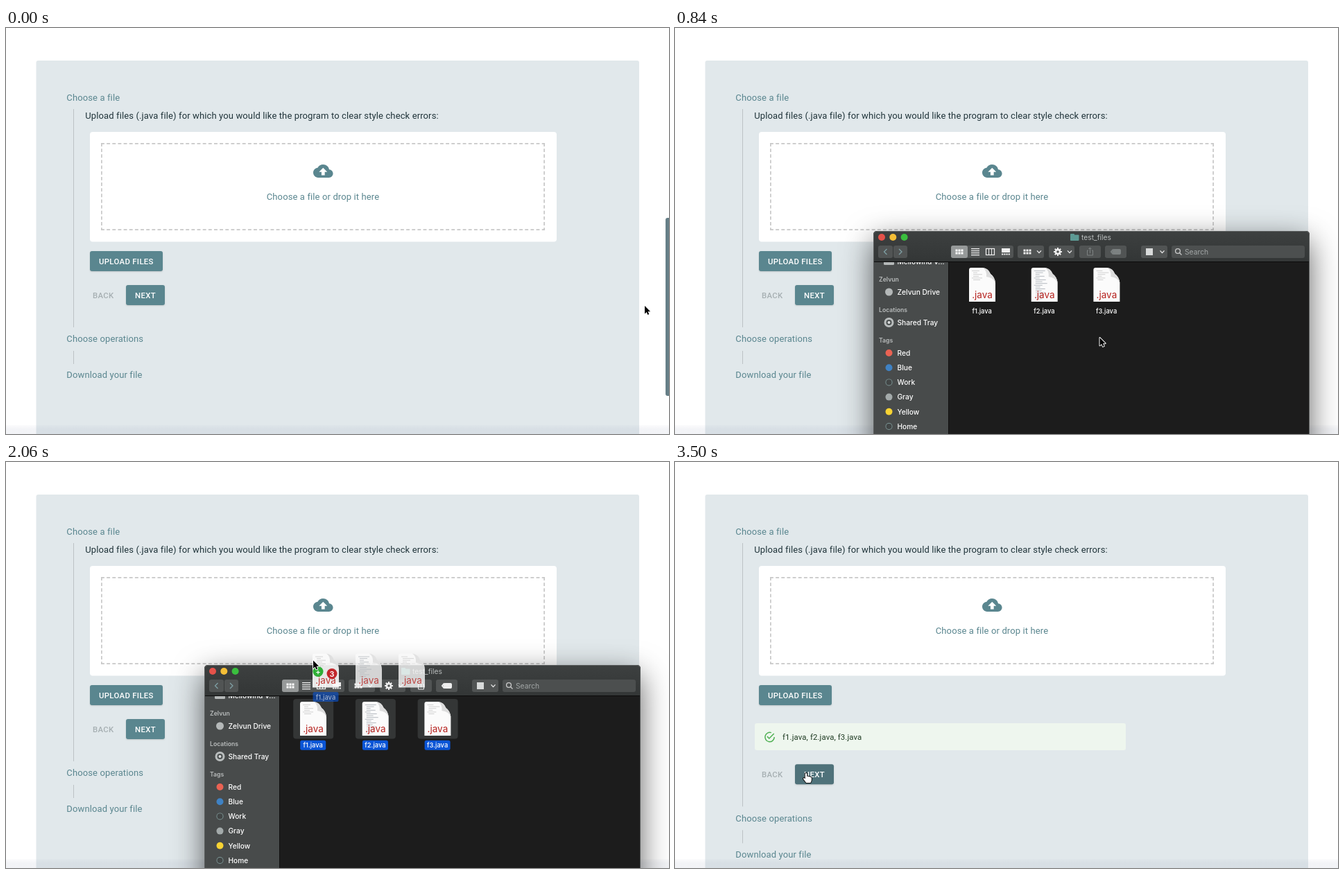
These frames come from a looping animation (956x586 px, 3520 ms). An HTML page with a canvas:

```html
<!DOCTYPE html>
<html lang="en">
<head>
<meta charset="utf-8">
<title>File upload</title>
<style>
html, body { margin: 0; width: 956px; height: 586px; overflow: hidden; background: #fff; }
canvas { display: block; }
</style>
</head>
<body>
<canvas id="stage" width="956" height="586"></canvas>
<script>
const LOOP = 3520, STEP = 20;
const TEAL = '#5a868f';
const stage = document.getElementById('stage').getContext('2d');

// The file window is painted here first, so that it can be warped row by row.
const LEFT = 226, TOP = 233;
const sheet = document.createElement('canvas');
sheet.width = 760;
sheet.height = 520;
const win = sheet.getContext('2d');
let c = stage;

const CLOUD = new Path2D('M19.35 10.04C18.67 6.59 15.64 4 12 4 9.11 4 6.6 5.64 5.35 8.04 2.34 8.36 0 10.91 0 14c0 3.31 2.69 6 6 6h13c2.76 0 5-2.24 5-5 0-2.64-2.05-4.78-4.65-4.96zM14 13v4h-4v-4H7l5-5 5 5h-3z');
const CHECK = new Path2D('M20 12A8 8 0 1 1 14.2 4.31L15.77 2.74A10 10 0 1 0 22 12M7.91 10.08L6.5 11.5 11 16 21 6 19.59 4.58 11 13.17z');
const ARROW = new Path2D('M0 0V12L2.8 9.4 4.6 13.6 6.6 12.7 4.8 8.7H8.6z');
const HAND = new Path2D('M-1.2 1Q0-.8 1.2 1V5Q2.6 4 3.6 5.3 5 4.6 5.8 5.9 7.6 5.6 7.8 7.2V10Q7.6 12 6.3 14H.2Q-1.6 11.4-3.8 8.8-4.4 7-2.8 7L-1.2 8.4z');
const PAGE = new Path2D('M0 3Q0 0 3 0H20Q28 1 31 9 37 13 38 22V49H0z');
const FOLD = new Path2D('M20 0Q28 1 31 9 37 13 38 22 35 14 25 13 26 4 20 0z');

// time, x, y of the pointer tip
const PATH = [
  [0, 921, 401], [60, 921, 401], [160, 880, 490], [280, 800, 604], [560, 780, 604],
  [680, 690, 520], [820, 612.5, 447], [860, 612.5, 447], [960, 680, 415], [1060, 718, 389],
  [1120, 718, 389], [1320, 464, 385], [1400, 412, 379], [1500, 412, 379], [1620, 425, 357],
  [1760, 425, 357], [1900, 432, 330], [2060, 443, 286.5], [2180, 408, 248], [2300, 378, 222],
  [2820, 378, 222], [3000, 310, 310], [3180, 222, 424], [3320, 189, 449], [3520, 189, 449]
];

const mix = (a, b, k) => a + (b - a) * k;
const part = (t, a, b) => Math.min(1, Math.max(0, (t - a) / (b - a)));
const wave = k => (1 - Math.cos(Math.PI * k)) / 2;

function pointer(t) {
  const i = Math.max(1, PATH.findIndex(p => p[0] >= t));
  const a = PATH[i - 1], b = PATH[i], k = part(t, a[0], b[0]);
  return [mix(a[1], b[1], k), mix(a[2], b[2], k)];
}

function box(x, y, w, h, fill, r = 0) {
  c.fillStyle = fill;
  c.beginPath();
  c.roundRect(x, y, w, h, r);
  c.fill();
}

function dot(x, y, r, fill) {
  c.fillStyle = fill;
  c.beginPath();
  c.arc(x, y, r, 0, 7);
  c.fill();
}

function line(points, color, width = 1) {
  c.strokeStyle = color;
  c.lineWidth = width;
  c.beginPath();
  points.forEach(p => c.lineTo(...p));
  c.stroke();
}

function text(str, x, y, font, fill, gap = 0, align = 'left') {
  c.font = font + ', sans-serif';
  c.letterSpacing = gap + 'px';
  c.textAlign = align;
  c.fillStyle = fill;
  c.fillText(str, x, y);
}

function shape(path, x, y, fill, scale = 1, edge, width = 1) {
  c.save();
  c.translate(x, y);
  c.scale(scale, scale);
  if (edge) {
    c.strokeStyle = edge;
    c.lineWidth = width;
    c.lineJoin = 'round';
    c.stroke(path);
  }
  c.fillStyle = fill;
  c.fill(path);
  c.restore();
}

const body = (str, x, y, fill = TEAL, align) => text(str, x, y, '13px Roboto', fill, 0.122, align);
const caps = (str, x, y, fill) => text(str, x, y, '500 11.375px Roboto', fill, 0.325);

function button(label, x, y, w, fill) {
  c.save();
  c.shadowColor = 'rgba(0,0,0,.15)';
  c.shadowBlur = 2;
  c.shadowOffsetY = 1;
  box(x, y, w, 29, fill, 3);
  c.restore();
  caps(label, x + 13, y + 18.7, '#fff');
}

function dropZone(over) {
  box(121, 150, 673, 158.5, '#fff', 4);
  const color = over ? TEAL : '#c8c8c8';
  c.setLineDash([4.9, 3.25]);
  for (const y of [166.9, 291.1]) line([[137, y], [777, y]], color, 1.7);
  for (const x of [137.9, 776.1]) line([[x, 166], [x, 292]], color, 1.7);
  c.setLineDash([]);
  shape(CLOUD, 443, 192.2, TEAL, 1.19);
  body(over ? 'Drop it here!' : 'Choose a file or drop it here', 457, 247.6, TEAL, 'center');
}

function page(t) {
  const done = t >= 2760, push = done ? 65.3 : 0;
  box(0, 0, 956, 586, '#fff');
  box(43.5, 47, 869.5, 560, '#e1e8eb', 3);
  body('Choose a file', 87.3, 104.8);
  body('Upload files (.java file) for which you would like the program to clear style check errors:',
    114.3, 131, '#20343a');
  line([[97.5, 117], [97.5, 432 + push]], '#bcc2c4');
  line([[97.5, 466 + push], [97.5, 485 + push]], '#bcc2c4');
  dropZone(t >= 2100 && t < 2680);
  button('UPLOAD FILES', 121, 322, 105, TEAL);
  if (done) {
    box(115, 377, 535, 39, '#eef6ee', 3);
    shape(CHECK, 127.6, 388.1, '#4caf50', 0.745);
    text('f1.java, f2.java, f3.java', 155, 401, '11.375px Roboto', '#1e3a22', 0.122);
  }
  caps('BACK', 125, 389.6 + push, '#a6afb2');
  button('NEXT', 173, 371 + push, 56, t >= 3260 ? '#4f727a' : TEAL);
  body('Choose operations', 87.3, 453.4 + push);
  body('Download your file', 87.3, 505.4 + push);

  const dock = c.createLinearGradient(0, 573, 0, 579);
  dock.addColorStop(0, 'rgba(140,150,180,.03)');
  dock.addColorStop(1, 'rgba(140,150,180,.11)');
  box(0, 573, 956, 13, dock);

  c.globalAlpha = 1 - part(t, 160, 240);
  box(951, 274, 8, 257, '#667f87', 3);
  c.globalAlpha = 1;
}

function sheetIcon(n, x, y) {
  shape(PAGE, x, y, '#fbfbfb');
  const rows = n === 2 ? 12 : 6;
  for (let i = 0; i < rows; i++) {
    const indent = i % 4 ? 2 : 0, len = 6 + (i * 7 + n * 5) % 12;
    box(x + 4 + indent, y + 4 + i * 2.6, len, 1, n === 2 ? '#b4b9bf' : '#d0d0d0');
  }
  if (n === 2) for (let i = 0; i < 5; i++) box(x + 6, y + 35 + i * 2.4, 14 - i, 1, '#d3d7dc');
  shape(FOLD, x, y, '#dcdcdc');
  text('.java', x + 19, y + 43.5, '13.5px Inter', '#b5211d', 0, 'center');
}

function label(n, x, y, picked) {
  if (picked) box(x - 18.5, y - 10.5, 37, 14, '#0a55d6', 2.5);
  text(`f${n}.java`, x, y, '500 9.4px Inter', '#fff', 0, 'center');
}

function chevron(x, y, dx, dy, color) {
  const side = dx ? [[x - dx, y - 4], [x + dx, y], [x - dx, y + 4]]
    : [[x - 3, y - dy], [x, y + dy], [x + 3, y - dy]];
  line(side, color, 1.3);
}

function grid(x, y, color) {
  for (let i = 0; i < 6; i++) box(x - 5.5 + i % 3 * 4, y - 3.5 + (i > 2) * 4, 3, 3, color);
}

function toolbar(active, picked) {
  const cell = active ? '#515454' : '#343535';
  const ink = active ? '#eee' : '#7b7d7d', dim = active ? '#7c8181' : '#4a4c4c';
  [[293, 21], [315, 20], [398, 90], [494, 38], [539, 37], [583, 31], [620, 31], [672, 38]]
    .forEach(([x, w]) => box(x, 314, w, 18, cell, 3));
  chevron(303.5, 323, -2, 0, active ? '#7fa0a5' : dim);
  chevron(325, 323, 2, 0, active ? '#7fa0a5' : dim);
  box(398, 314, 24, 18, active ? '#969999' : '#4e5050', 3);
  grid(410, 323, active ? '#fff' : '#111');
  for (let i = 0; i < 4; i++) box(427, 318 + i * 3, 12, 1.3, ink);
  c.strokeStyle = ink;
  c.lineWidth = 1.2;
  c.strokeRect(448.5, 318.5, 12, 9);
  line([[452.5, 318], [452.5, 328]], ink);
  line([[456.5, 318], [456.5, 328]], ink);
  box(471, 318, 12, 6, ink);
  for (let i = 0; i < 4; i++) box(471 + i * 3.2, 325.5, 2.3, 2, ink);
  grid(508, 323, ink);
  chevron(525, 323, 0, 1.6, ink);
  for (let i = 0; i < 4; i++) {
    const a = i * Math.PI / 4, x = Math.cos(a) * 6, y = Math.sin(a) * 6;
    line([[552 - x, 323 - y], [552 + x, 323 + y]], ink, 2);
  }
  dot(552, 323, 4.4, ink);
  dot(552, 323, 1.8, cell);
  chevron(569, 323, 0, 1.6, ink);
  const lit = picked ? ink : dim;
  line([[596, 321], [594.5, 321], [594.5, 328], [602.5, 328], [602.5, 321], [601, 321]], lit);
  line([[598.5, 325], [598.5, 317], [596.5, 319], [598.5, 317], [600.5, 319]], lit);
  box(631, 319, 12, 8, lit, 2);
  line([[632, 319.5], [629, 323], [632, 326.5]], lit, 2);
  box(679, 318, 10, 10, active ? '#d8dada' : dim);
  chevron(702.5, 323, 0, 1.6, ink);
  box(716, 314, 192, 18, active ? '#4c4f4f' : '#333434', 3);
  c.strokeStyle = active ? '#ccc' : '#666';
  c.beginPath();
  c.arc(725, 322, 3.4, 0, 7);
  c.stroke();
  line([[727.5, 324.5], [730.5, 327.5]], c.strokeStyle, 1.2);
  text('Search', 735, 326.6, '10.3px Inter', active ? '#a2a6a6' : '#595b5b');
}

function sidebar(active) {
  const ink = active ? '#fff' : '#aeb0b0', head = active ? '#b9bcbc' : '#8f9292';
  const item = (str, y) => text(str, 320.5, y + 3.8, '500 10.2px Inter', ink);
  const title = (str, y) => text(str, 294, y + 3.2, '600 8.7px Inter', head);
  box(301, 331, 15, 11, '#b4b8b8', 1.5);
  item('Mellowind V...', 337);
  title('Zelvun', 362.5);
  dot(308.5, 381, 5.5, '#b4b8b8');
  item('Zelvun Drive', 381);
  title('Locations', 407);
  dot(308.5, 425, 7, '#b9bdbd');
  dot(308.5, 425, 4, '#4b5050');
  dot(308.5, 425, 2, '#d8dada');
  item('Shared Tray', 425);
  title('Tags', 451);
  const tags = [['Red', '#ea6253'], ['Blue', '#3f82c4'], ['Work'], ['Gray', '#a3aaaa'],
    ['Yellow', '#f8d333'], ['Home'], ['Important']];
  tags.forEach(([name, color], i) => {
    const y = 469 + i * 21.2;
    dot(308.5, y, 5, color || '#7d9696');
    if (!color) dot(308.5, y, 4.1, active ? '#424646' : '#2c2e2e');
    item(name, y);
  });
}

function fileWindow(active, picked) {
  c = win;
  c.setTransform(1, 0, 0, 1, 0, 0);
  c.clearRect(0, 0, sheet.width, sheet.height);
  c.translate(-LEFT, -TOP);
  c.save();
  c.shadowColor = active ? 'rgba(0,0,0,.62)' : 'rgba(0,0,0,.4)';
  c.shadowBlur = active ? 44 : 20;
  c.shadowOffsetY = active ? 14 : 4;
  box(286, 293, 629, 520, '#1c1c1c', 5);
  c.restore();
  c.save();
  c.beginPath();
  c.roundRect(286, 293, 629, 520, 5);
  c.clip();
  box(286, 337, 108.5, 480, active ? '#484b4b' : '#2e3030');
  sidebar(active);
  box(394, 337, 1, 480, '#111');
  const bar = c.createLinearGradient(0, 293, 0, 338);
  bar.addColorStop(0, active ? '#3d4040' : '#2b2c2c');
  bar.addColorStop(1, active ? '#333636' : '#272828');
  box(286, 293, 629, 44.5, bar);
  box(286, 337, 629, 1, '#0c0c0c');
  c.restore();
  c.strokeStyle = active ? '#5a5d5d' : '#3c3e3e';
  c.lineWidth = 1;
  c.beginPath();
  c.roundRect(286.5, 293.5, 628, 520, 5);
  c.stroke();
  ['#e5524a', '#f4be36', '#3abf3e'].forEach((color, i) =>
    dot(298 + i * 16.3, 302, 5, active ? color : '#505252'));
  const folder = active ? '#5d9a94' : '#565a5a';
  box(570, 297, 6, 3, folder, 1);
  box(570, 298.5, 12.5, 8.5, folder, 1);
  text('test_files', 586, 306, '10.3px Inter', active ? '#b9bdbd' : '#777a7a');
  toolbar(active, picked.length === 3);
  for (let n = 1; n <= 3; n++) {
    const x = 353 + n * 89.7, on = picked.includes(n);
    if (on) {
      box(x - 28.5, 342, 58, 57.5, '#343636', 4);
    }
    sheetIcon(n, x - 18.7, 346);
    label(n, x, 412.3, on);
  }
  c = stage;
}

// Rows slide along an S-shaped funnel; bend 0 leaves the window straight.
function place(dy, bend) {
  if (!dy && !bend) return c.drawImage(sheet, LEFT, TOP);
  for (let y = 200; y < 586; y++) {
    const row = y - dy - TOP;
    if (row < 0 || row >= sheet.height) continue;
    const s = bend * 268 * wave(part(y, 272, 672));
    const x = LEFT + s * (1.04 - 0.8 * (LEFT - 287) / 628);
    c.drawImage(sheet, 0, row, sheet.width, 1, x, y, sheet.width * (1 - 0.8 * s / 628), 1);
  }
}

function dragged(t, x, y) {
  const k = wave(part(t, 1760, 1960)), gap = mix(89.7, 62, k);
  for (let n = 3; n >= 1; n--) {
    c.globalAlpha = n === 1 ? 0.9 : 0.8;
    sheetIcon(n, x - 1 + (n - 1) * gap, y - 10);
    c.globalAlpha = n === 1 ? 0.6 : 0.6 * (1 - k);
    label(n, x + 18 + (n - 1) * gap, y + 56, true);
  }
  c.globalAlpha = 1;
  const badge = (str, bx, by, color) => {
    dot(bx, by, 7.5, color);
    text(str, bx, by + 4, '600 11px Inter', '#fff', 0, 'center');
  };
  badge('3', x + 27, y + 19, '#c3262b');
  if (t >= 2040) badge('+', x + 7, y + 16, '#2fae36');
}

function draw(t) {
  const [x, y] = pointer(t);
  page(t);
  if (t >= 320 && t < 2400) {
    const edge = pointer(Math.min(t, 1400) - 10)[0] + 1;
    const picked = t > 1120 ? [1, 2, 3].filter(n => edge < 382 + n * 89.7 - (n === 1 ? 10 : 0)) : [];
    fileWindow(t >= 600, picked);
    const settle = wave(part(t, 480, 600));
    place(Math.round(mix(mix(330, -16, part(t, 320, 480)), 0, settle)), 1 - settle);
    if (t > 1120 && t < 1480) {
      box(edge, 385.5, 718 - edge, 3.5, 'rgba(255,255,255,.2)');
      c.strokeStyle = 'rgba(255,255,255,.35)';
      c.lineWidth = 1;
      c.strokeRect(edge, 385.5, 718 - edge, 3.5);
    }
    if (t >= 1760) dragged(t, x, y);
  }
  if (t >= 3260) shape(HAND, x, y, '#fff', 1, '#111', 2);
  else shape(ARROW, x, y, '#000', 0.95, '#fff', 2);
}

function frame() {
  draw(Math.floor(performance.now() % LOOP / STEP) * STEP);
  requestAnimationFrame(frame);
}
frame();
</script>
</body>
</html>
```
